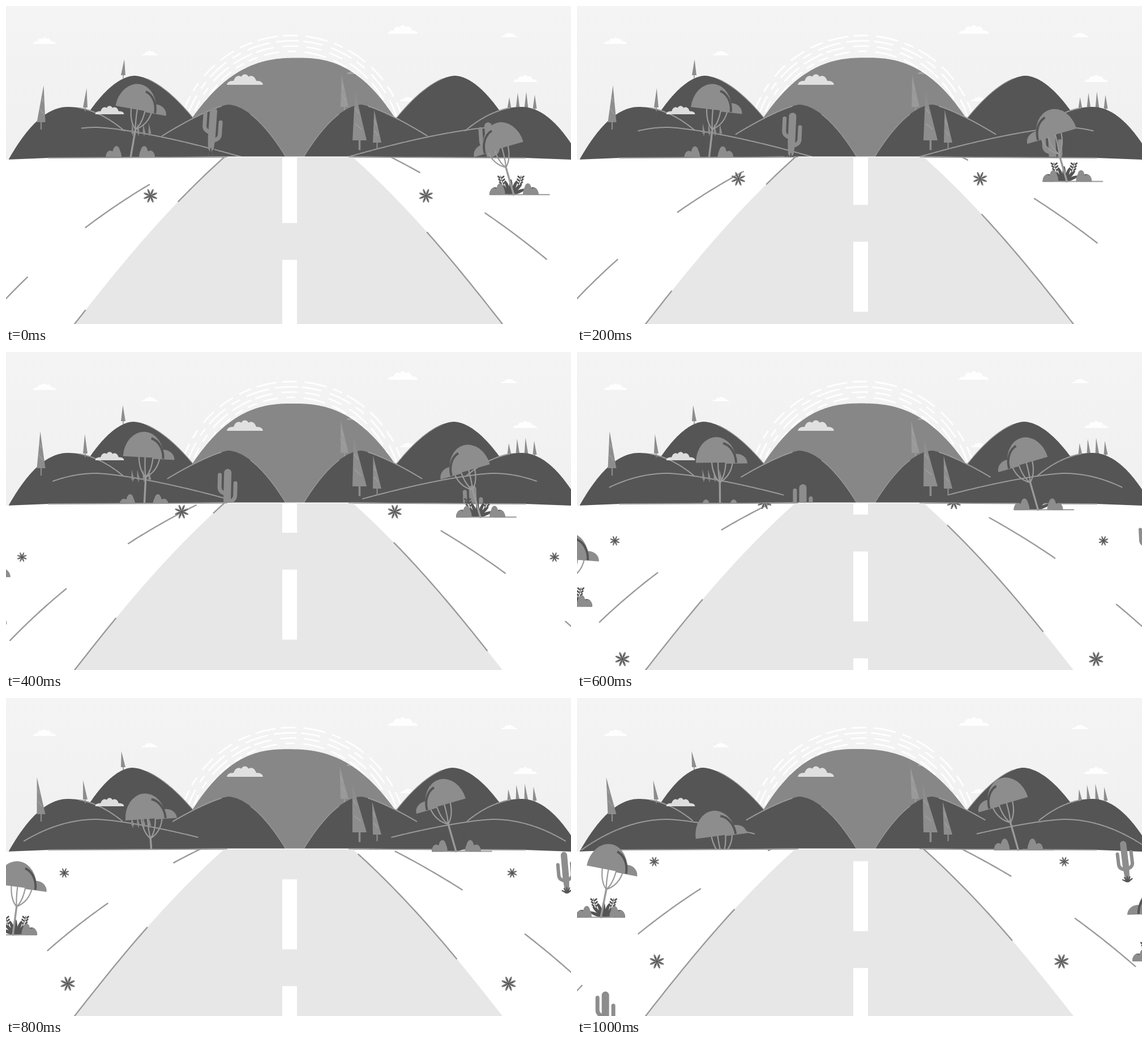
Recreate the animation shown at these times as an HTML page with a canvas. Size 998 px wide and 561 px high, loop 1.2 s.

```html
<!DOCTYPE html>
<html lang="en">
<head>
<meta charset="utf-8">
<title>Desert road</title>
<style>
html, body { margin: 0; width: 100%; height: 100%; overflow: hidden; background: #fff; }
canvas { display: block; width: 100vw; height: 100vh; }
</style>
</head>
<body>
<canvas id="stage" width="998" height="561"></canvas>
<script>
const W = 998, H = 561, LOOP = 1200, STEP = 200, HORIZON = 266;
const DARK = '#555', MID = '#878787', PLANT = '#8d8d8d', LINE = '#9a9a9a';
const c = document.getElementById('stage').getContext('2d');

// Position after t steps from start, speed and curvature per axis
const glide = (t, x, vx, ax, y, vy, ay) => [x + vx * t + ax * t * t, y + vy * t + ay * t * t];

// Height curve with one peak; each side falls to its foot [x, y, power]
const hill = (peak, top, left, right) => x => {
  const [fx, fy, p] = x < peak ? left : right;
  return top + (fy - top) * Math.abs((x - peak) / (fx - peak)) ** p;
};

function outline(curve, from, to) {
  c.beginPath();
  for (let x = from; x < to; x += 2) c.lineTo(x, curve(x));
  c.lineTo(to, curve(to));
}

function fillHill(curve, from, to, color) {
  outline(curve, from, to);
  c.lineTo(to, 271);
  c.lineTo(from, 271);
  c.fillStyle = color;
  c.fill();
}

function pen(color, width, cap = 'round') {
  c.strokeStyle = color;
  c.lineWidth = width;
  c.lineCap = cap;
}

function contour(curve, from, to, width = 2) {
  pen(LINE, width);
  outline(curve, from, to);
  c.stroke();
}

function within(y, h, draw) {
  c.save();
  c.beginPath();
  c.rect(0, y, W, h);
  c.clip();
  draw();
  c.restore();
}

function place([x, y], deg, flip, draw, scale = 1) {
  c.save();
  c.translate(x, y);
  c.rotate(deg * Math.PI / 180);
  c.scale(flip ? -scale : scale, scale);
  draw();
  c.restore();
}

function oval(x, y, rx, ry, turn = 0) {
  c.beginPath();
  c.ellipse(x, y, rx, ry, turn, 0, 7);
  c.fill();
}

function dome(x, y, rx, h, color = PLANT) {
  c.beginPath();
  c.ellipse(x, y, rx, h, 0, Math.PI, 0);
  c.fillStyle = color;
  c.fill();
}

function cloud(x, y, w, alpha = 0.9) {
  c.beginPath();
  for (let i = -2; i <= 2; i++) {
    const cx = x + i * .17 * w, h = w * (.29 - .045 * i * i);
    c.moveTo(cx - .16 * w, y);
    c.ellipse(cx, y, .16 * w, h, 0, Math.PI, 0);
  }
  c.fillStyle = `rgba(255,255,255,${alpha})`;
  c.fill();
}

function halo(u) {
  let seed = 11;
  const rnd = () => (seed = seed * 16807 % 2147483647) / 2147483647;
  pen('#fff', 2.8);
  for (let r = 204; r > 174; r -= 9.3) {
    let a = Math.PI + .36 + rnd() * .08;
    while (a < 2 * Math.PI - .36) {
      const len = .06 + rnd() * .15;
      c.beginPath();
      c.arc(505, 256, r, a - u * .005, Math.min(a + len, 2 * Math.PI - .32) - u * .005);
      c.stroke();
      a += len + .05 + rnd() * .05;
    }
  }
}

// lean is the tip's sideways shift as a share of the height
function pine(x, base, w, h, lean, color = PLANT) {
  const top = base - h, tip = x + lean * h;
  pen(color, Math.max(1.5, w / 7), 'butt');
  c.beginPath();
  c.moveTo(x, base - 2);
  c.lineTo(x, base + h * .2);
  c.stroke();
  c.beginPath();
  c.moveTo(tip, top);
  c.lineTo(x + w / 2, base);
  c.lineTo(x - w / 2, base);
  c.fillStyle = color;
  c.fill();
  if (h < 50) return;
  pen('#a3a3a3', 1.2);
  c.beginPath();
  for (const k of [.4, .72]) {
    const cx = tip + (x - tip) * k, s = w * k * .3;
    c.moveTo(cx - s, top + h * k - 5);
    c.lineTo(cx + s, top + h * k + 4);
  }
  c.stroke();
}

function blades(x, n, len, spread) {
  c.fillStyle = DARK;
  for (let i = 0; i < n; i++) {
    const a = (i / (n - 1) - .5) * spread;
    oval(x + Math.sin(a) * len / 2, -Math.cos(a) * len / 2, len / 9, len / 2, a);
  }
}

function fern(x, lean) {
  pen(DARK, 1.2);
  c.beginPath();
  c.moveTo(x, 0);
  c.quadraticCurveTo(x + lean * .8, -14, x + lean, -33);
  c.stroke();
  c.fillStyle = DARK;
  for (let k = 0; k < 3; k++) {
    for (const s of [-1, 1]) oval(x + lean * (.84 + k * .07) + 3.5 * s, -21 - k * 5, 3.3, 1.5, -.7 * s);
  }
}

function bush(x, side) {
  dome(x + 9 * side, 0, 10, 13, DARK);
  dome(x + 11 * side, 0, 8, 12);
  dome(x, 0, 9, 17);
  dome(x, -11, 6, 9);
}

function undergrowth() {
  fern(4, -17);
  fern(4, 19);
  blades(5, 7, 27, 2.4);
  pen(LINE, 2);
  c.beginPath();
  c.moveTo(-63, 0);
  c.lineTo(42, 0);
  c.stroke();
  bush(-25, -1);
  bush(24, 1);
}

function trunkAndCrown() {
  pen(LINE, 3.4);
  c.beginPath();
  c.moveTo(0, 0);
  c.lineTo(0, -52);
  c.stroke();
  c.lineWidth = 2.2;
  c.beginPath();
  for (const x of [-14, -3, 11, 23]) {
    c.moveTo(0, -50);
    c.quadraticCurveTo(x * .9, -62, x, -87);
  }
  c.stroke();
  c.translate(0, -85);
  dome(30, 2, 19, 17);
  dome(-6, 0, 36, 45);
  pen(DARK, 4, 'butt');
  c.beginPath();
  c.ellipse(0, 1, 29, 36, 0, -1.35, 0);
  c.stroke();
}

function tree(pos, deg, flip) {
  place(pos, 0, flip, undergrowth);
  place(pos, deg, flip, trunkAndCrown);
}

function cactus(pos, deg, { flip = false, scale = 1, reach = 73 } = {}) {
  place(pos, deg, flip, () => {
    c.fillStyle = PLANT;
    c.beginPath();
    c.moveTo(-4, 0);
    c.lineTo(-6.5, -30);
    c.arc(0, -77.5, 6.5, Math.PI, 0);
    c.lineTo(6.5, -30);
    c.lineTo(4, 0);
    c.fill();
    pen(PLANT, 7);
    c.beginPath();
    for (const [x, top] of [[-14, reach], [14, 59]]) {
      c.moveTo(x, -top);
      c.lineTo(x, 22 - top);
      c.quadraticCurveTo(x, 31 - top, 0, 34 - top);
    }
    c.stroke();
    blades(0, 5, 13, 2);
  }, scale);
}

function flower(x, y, r) {
  for (let i = 0; i < 8; i++) {
    place([x, y], i * 45 + 22.5, false, () => {
      c.fillStyle = '#777';
      oval(r * .56, 0, r * .44, r * .14);
      pen('#4c4c4c', 1);
      c.beginPath();
      c.moveTo(0, 0);
      c.lineTo(r * .6, 0);
      c.stroke();
    });
  }
}

function flowerPair([x, y], r) {
  flower(x, y, r);
  flower(W - 1 - x, y, r);
}

// Ground curves, one unit of s per step of travel
const edge = s => [140 + 26.8 * s + .03 * s ** 3, 537 - 34 * s + .25 * s * s];
const edgeRight = s => { const [x, y] = edge(s); return [W - x, y]; };
const laneLeft = s => glide(s, 7, 32, .588, 509, -33, .676);
const laneRight = s => glide(s, 955, -35.7, -.4, 447, -29.5, .59);

function follow(curve, from, to) {
  for (let i = 0; i <= 24; i++) c.lineTo(...curve(from + (to - from) * i / 24));
}

function mark(curve, from, len) {
  c.beginPath();
  follow(curve, from, from + len);
  c.stroke();
}

// Left half of the range; the right half is its mirror image
function range(u, drift) {
  const back = hill(227 - drift, 123, [148, 185, 1.8], [330, 197, 1.7]);
  const near = hill(109, 178, [5, 270, 2], [210, 221, 2]);
  const mid = hill(392, 174, [276, 229, 1.3], [494, 266, 1.8]);
  const ridge = hill(160, 214, [8, 268, 2], [415, 266, 1.4]);
  fillHill(back, 130, 340, DARK);
  contour(back, 250, 330, 1.3);
  fillHill(near, 5, 212, DARK);
  fillHill(mid, 276, 494, DARK);
  contour(near, 130, 209 - u);
  contour(mid, 276 + 4.7 * u, 380);
  contour(mid, 432, 494, 1.3);
  contour(ridge, Math.max(8, 134 - 25.5 * u), Math.min(415, 441 - 25.5 * u));
}

function scenery(u) {
  const sky = c.createLinearGradient(0, 0, 0, HORIZON);
  sky.addColorStop(0, '#f4f4f4');
  sky.addColorStop(1, '#f0f0f0');
  c.fillStyle = sky;
  c.fillRect(0, 0, W, H);
  halo(u);
  for (const [x, y, w] of [[68, 67, 40], [254, 87, 28], [701, 49, 53], [889, 55, 28], [917, 134, 42]]) cloud(x, y, w);

  fillHill(hill(515 - 4.4 * u, 91.5 - .3 * u, [332, 193, 2.5], [684, 193, 2.5]), 322, 694, MID);
  cloud(617, 120, 30, .22);
  cloud(422, 139, 64, .74);
  cloud(710, 168, 28, .8);

  const west = .07 - .046 * u, east = -.09 - .015 * u;
  pine(598, 178, 14, 57, east, '#999');
  pine(207, 122, 8, 28, west);
  for (let i = 0; i < 4; i++) pine(889 + 15 * i, 181, 7, 20 + 10 * Math.sin(i * .9), -.023 * u);

  range(u, u);
  c.save();
  c.translate(1020, 0);
  c.scale(-1, 1);
  range(u, -u);
  c.restore();

  cloud(183, 191, 51, .8);
  pine(140, 179, 8, 34, west);
  for (let i = 0; i < 4; i++) pine(224 + i * 10, 225, 5, 18, east);
  pine(62, 205, 15, 65, west);
  pine(624.5, 237, 25, 86, east);
  pine(655.5, 241, 15, 58, east);
}

function ground(u) {
  c.fillStyle = '#fff';
  c.beginPath();
  for (const [x, y] of [[0, 271], [75, 268], [380, 265.5], [615, 265.5], [918, 268], [W, 271], [W, H], [0, H]]) c.lineTo(x, y);
  c.fill();
  pen(LINE, 2);
  c.beginPath();
  c.moveTo(75, 268);
  c.lineTo(390, 266.5);
  c.moveTo(606, 266.5);
  c.lineTo(918, 268);
  c.stroke();

  within(267, H, () => {
    c.beginPath();
    follow(edge, -1.2, 8.6);
    follow(edgeRight, 8.6, -1.2);
    c.fillStyle = '#e7e7e7';
    c.fill();
    c.fillStyle = '#fff';
    for (let k = -1; k < 2; k++) c.fillRect(488, 448 - 32 * u + k * 188.5, 26, 123.5);
    pen(LINE, 2.4);
    mark(edge, u - 5.9, 5.9);
    mark(edge, u + 5.9, 4);
    mark(edgeRight, u - 1.7, 5.87);
    for (let k = -1; k < 2; k++) {
      mark(laneLeft, u - 2 + 5.89 * k, 2.94);
      mark(laneRight, u + 5.89 * k, 2.94);
    }
    flowerPair(glide(u, 255, 32, -2.2, 335, -33.4, 3.4), 13);
    flowerPair(glide(u - 2, 28, 40, -1.3, 362, -31, 2.2), 9);
    flowerPair(glide(u - 3, 80, 27.5, 1.5, 542, -37, -.75), 13.5);
  });
}

function plants(u) {
  const v = u - 5;
  // These sink behind the horizon
  within(0, HORIZON, () => {
    cactus(glide(u, 361, 18, -1.8, 263, 4.5, 4.5), 4 - 1.3 * u);
    cactus(glide(u, 857, -15, 0, 289, 3, 6), u - 4);
    tree([220 + 14.5 * u - 1.2 * u * u, 267 + .48 * u ** 3], 10 - 3.5 * u);
  });
  tree(glide(u, 897, -33.5, 2, 333, -26, 2.6), -16, true);
  tree(glide(v, 42, 31, 1, 387, -31, 0), 11 + 3.5 * v);
  tree(glide(v, 1024, -26, 0, 464, -28, 0), -2, true);
  cactus(glide(v, 973, -18.5, 0, 325, -19.5, 0), -7 - 2 * v, { flip: true, scale: .87, reach: 60 });
  cactus(glide(v, 50, 35, 0, 602, -45, 0), 0);
}

const start = performance.now();
function tick() {
  const u = (performance.now() - start) % LOOP / STEP;
  scenery(u);
  ground(u);
  plants(u);
  requestAnimationFrame(tick);
}
tick();
</script>
</body>
</html>
```
